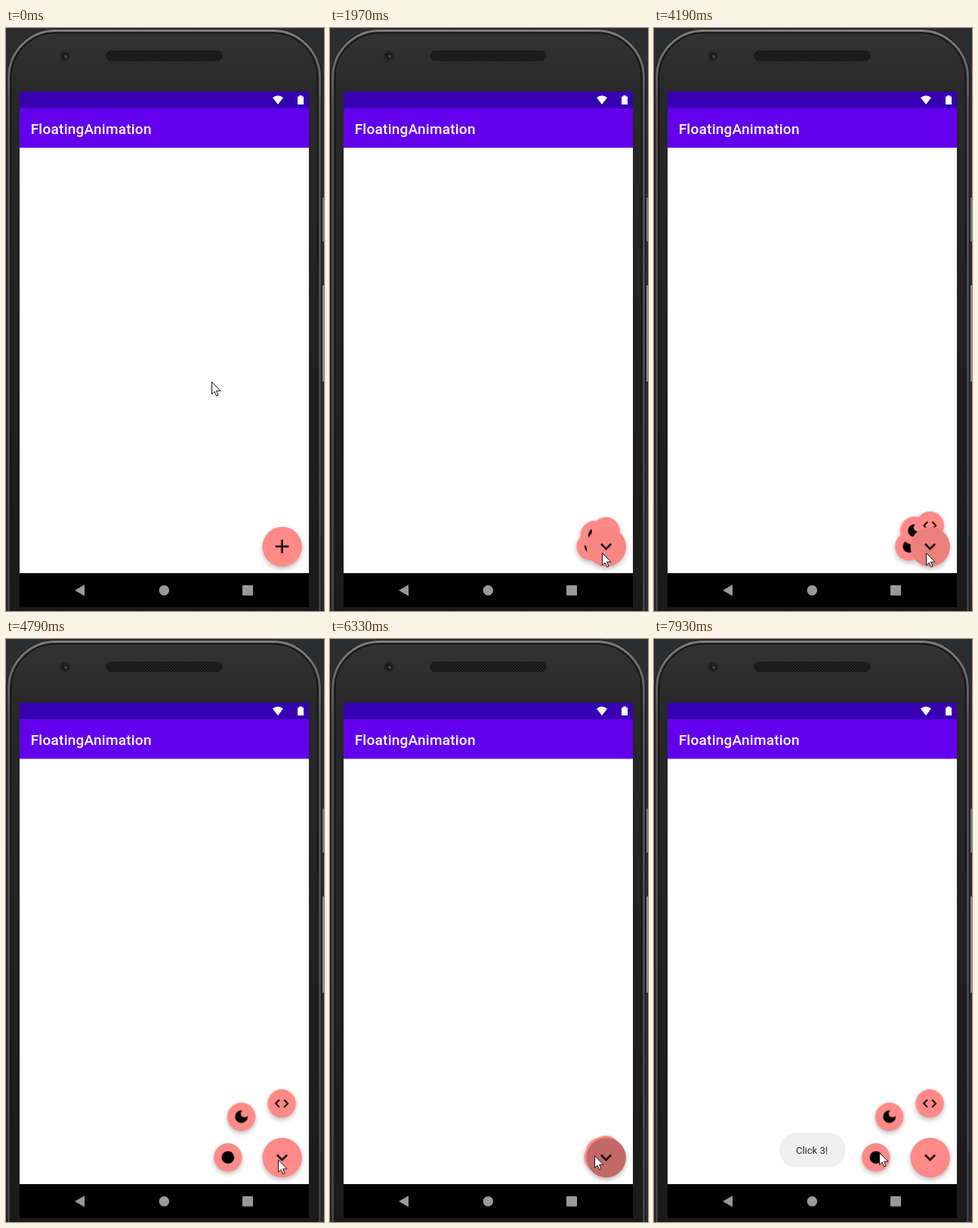
An HTML page for the animation above (8 s loop, 421 by 770 pixels).

```html
<!DOCTYPE html>
<html lang="en">
<head>
<meta charset="utf-8">
<title>Floating action menu</title>
<style>
  html, body { margin: 0; width: 100%; height: 100%; overflow: hidden; background: #2c2d2f; }
  svg { display: block; width: 421px; height: 770px; }
  text { font-family: Roboto, sans-serif; }
  #menu { filter: drop-shadow(0 3px 3px rgba(0, 0, 0, .26)); }
  .tint { fill: #000; opacity: 0; }
  #toast { opacity: 0; }
</style>
</head>
<body>
<svg viewBox="0 0 421 770">
  <defs>
    <linearGradient id="body" x2="0" y2="1">
      <stop offset="0" stop-color="#333"/>
      <stop offset=".1" stop-color="#282828"/>
      <stop offset="1" stop-color="#191919"/>
    </linearGradient>
    <linearGradient id="rim" x2="0" y2="1">
      <stop offset="0" stop-color="#7c7c7c"/>
      <stop offset=".12" stop-color="#505050"/>
      <stop offset="1" stop-color="#404040"/>
    </linearGradient>
    <linearGradient id="barShadow" x2="0" y2="1">
      <stop offset="0" stop-color="#c9b8e6"/>
      <stop offset="1" stop-color="#fff"/>
    </linearGradient>
    <pattern id="mesh" width="4" height="4" patternUnits="userSpaceOnUse">
      <rect width="4" height="4" fill="#242424"/>
      <circle cx="1" cy="1" r="1" fill="#101010"/>
      <circle cx="3" cy="3" r="1" fill="#101010"/>
    </pattern>
    <clipPath id="screen"><rect x="18" y="84" width="383" height="636"/></clipPath>
  </defs>

  <!-- phone -->
  <rect width="421" height="770" fill="#2c2d2f"/>
  <rect x="1" y="1.500" width="417" height="860" rx="64" fill="#161616"/>
  <rect x="3.500" y="3.500" width="412" height="860" rx="62" fill="url(#body)" stroke="url(#rim)" stroke-width="3"/>
  <rect x="6.500" y="6.500" width="406" height="860" rx="59" fill="none" stroke="#191919" stroke-width="2"/>
  <rect x="419" y="224" width="2" height="58" fill="#777"/>
  <rect x="419" y="340" width="2" height="127" fill="#8c8c8c"/>
  <circle cx="78" cy="37" r="7" fill="#242424"/>
  <circle cx="78" cy="37" r="4.500" fill="#1b1b1b"/>
  <circle cx="79" cy="37.500" r="2" fill="#484848"/>
  <rect x="133" y="30.500" width="153" height="12.500" rx="6" fill="url(#mesh)" stroke="#151515"/>

  <!-- screen -->
  <rect x="18" y="84" width="383" height="22" fill="#3700b3"/>
  <rect x="18" y="106" width="383" height="52" fill="#6200ee"/>
  <rect x="18" y="158" width="383" height="562" fill="#fff"/>
  <rect x="18" y="158" width="383" height="2" fill="url(#barShadow)"/>
  <rect x="18" y="720" width="383" height="45" fill="#000"/>
  <path d="M360 101 L353 92 Q360 86.500 367 92 Z" fill="#fff"/>
  <path d="M386 90.500 h2.300 v-1.500 h3.400 v1.500 h2.300 v10.500 h-8 z" fill="#fff"/>
  <text x="32.700" y="139.500" font-size="19" font-weight="500" letter-spacing=".24" fill="#fff">FloatingAnimation</text>
  <g fill="#999">
    <path d="M91 742.800 L104 735.300 V750.300 Z"/>
    <circle cx="209.300" cy="742.800" r="6.800"/>
    <rect x="313" y="736" width="14" height="13.500" rx="1"/>
  </g>

  <g clip-path="url(#screen)">
    <g id="toast">
      <rect x="166" y="652" width="87.500" height="46" rx="22.500" fill="#efefef"/>
      <text x="188" y="680" font-size="13" fill="#2b2b2b">Click 3!</text>
    </g>

    <g id="menu">
      <g class="child" data-dx="-71.500" data-dy="0">
        <circle cx="365.300" cy="684.700" r="18.700" fill="#ff8a87"/>
        <circle cx="365.300" cy="684.700" r="8.300"/>
      </g>
      <g class="child" data-dx="-53.700" data-dy="-53.700">
        <circle cx="365.300" cy="684.700" r="18.700" fill="#ff8a87"/>
        <path transform="translate(354.100 673.500) scale(.932)" d="M12 3a9 9 0 1 0 9 9c0-.46-.04-.92-.1-1.360a5.390 5.390 0 0 1-4.400 2.260 5.400 5.400 0 0 1-3.140-9.800C12.920 3.040 12.460 3 12 3z"/>
        <circle id="moonTint" class="tint" cx="365.300" cy="684.700" r="18.700"/>
      </g>
      <g class="child" data-dx="-0.300" data-dy="-71.300">
        <circle cx="365.300" cy="684.700" r="18.700" fill="#ff8a87"/>
        <path transform="translate(354.100 673.500) scale(.932)" d="M9.400 16.600 4.800 12l4.600-4.600L8 6l-6 6 6 6zm5.200 0 4.600-4.600-4.600-4.600L16 6l6 6-6 6z"/>
      </g>

      <circle cx="365.700" cy="685" r="26.200" fill="#ff8a87"/>
      <circle id="mainTint" class="tint" cx="365.700" cy="685" r="26.200"/>
      <g transform="translate(350.500 669.700) scale(1.250)">
        <path id="plus" d="M19 13h-6v6h-2v-6H5v-2h6V5h2v6h6z"/>
        <path id="chevron" opacity="0" d="M16.590 8.590 12 13.170 7.410 8.590 6 10l6 6 6-6z"/>
      </g>
    </g>
  </g>

  <path id="cursor" d="M.5 .5V16.600L4.200 13.200 6.700 19 9 18 6.600 12.200H11.900Z" fill="#fff" stroke="#111" stroke-width="1"/>
</svg>

<script>
const LOOP = 8000;
const SLIDE = 400;
const SINE = 'cubic-bezier(.37,0,.63,1)';
const $ = id => document.getElementById(id);

// steps: [time, value, easing to the next step]
function track(el, prop, steps) {
  const all = [[0, steps[0][1]], ...steps, [LOOP, steps[steps.length - 1][1]]];
  el.animate(all.map(([t, value, easing = 'linear']) =>
    ({ offset: t / LOOP, [prop]: value, easing })),
    { duration: LOOP, iterations: Infinity });
}

// the menu opens and closes in turn
const toggles = [1828, 3090, 4020, 5146, 6232];
const move = (x, y) => `translate(${x}px, ${y}px)`;

for (const el of document.querySelectorAll('.child')) {
  const { dx, dy } = el.dataset;
  const ends = [move(0, 0), move(dx, dy)];
  track(el, 'transform', toggles.flatMap((t, i) =>
    [[t, ends[i % 2], SINE], [t + SLIDE, ends[(i + 1) % 2]]]));
}

const swap = (el, first) => track(el, 'opacity',
  [[0, first, 'step-end'], ...toggles.map((t, i) => [t, i % 2 ? first : 1 - first, 'step-end'])]);
swap($('plus'), 1);
swap($('chevron'), 0);

// presses: [down, release, faded]
const tint = (el, presses, peak) => track(el, 'opacity', presses.flatMap(([down, up, end]) =>
  [[down, 0], [down + 120, peak], [up, peak], [end, 0]]));
tint($('mainTint'), [
  [1520, 1820, 1990], [2930, 3090, 3410], [3850, 4014, 4280],
  [4990, 5146, 5460], [6080, 6335, 6600]
], .235);
tint($('moonTint'), [[7190, 7340, 7560]], .2);

track($('toast'), 'opacity', [[7330, 0], [7620, 1]]);

track($('cursor'), 'transform', [
  [560, 272, 467, SINE], [1320, 355, 688], [1380, 360, 693],
  [4700, 360, 693], [4850, 360, 684], [5090, 360, 684, SINE],
  [5320, 298, 515], [5430, 298, 515, 'ease-in'], [5730, 338, 622],
  [5900, 355, 692], [6090, 350, 682],
  [6640, 350, 682, SINE], [7070, 312, 630],
  [7360, 312, 630, SINE], [7730, 300, 675],
  [7830, 300, 675], [7920, 298, 678]
].map(([t, x, y, easing]) => [t, move(x, y), easing]));
</script>
</body>
</html>
```
